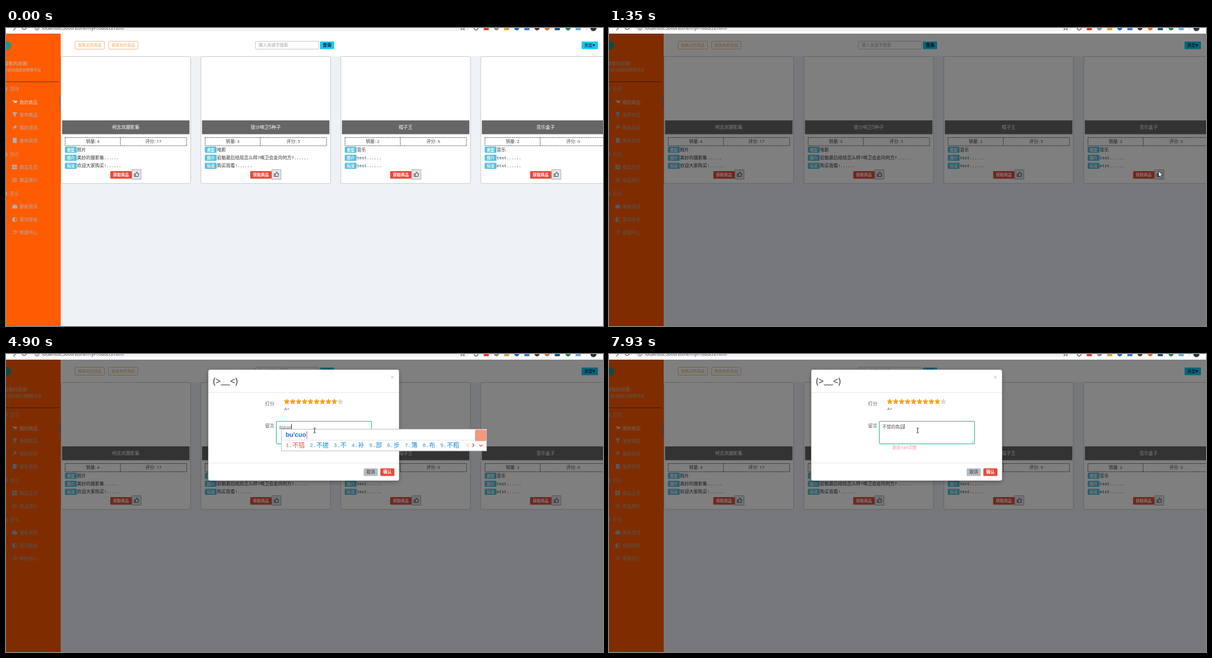
An HTML page that plays this animation: 1059x529 px, repeating every 8 s.

```html
<!DOCTYPE html>
<html lang="zh-CN">
<head>
<meta charset="utf-8">
<title>myProducts</title>
<style>
html, body { margin: 0; width: 100%; height: 100%; overflow: hidden; background: #eef2f7; }
svg { display: block; width: 1059px; height: 529px; font-family: "Open Sans", "Noto Sans CJK SC", "Noto Sans CJK", sans-serif; }
text { white-space: pre; }
.cjk { font-family: "Noto Sans CJK SC", "Noto Sans CJK", sans-serif; }
.mono { font-family: "Liberation Mono", monospace; }
.mid { text-anchor: middle; }
.b { font-weight: 700; }
.pinyin { font: bold 11.2px "Liberation Sans", sans-serif; }
.comp { text-decoration: underline; }
.line { fill: none; stroke: currentColor; }
</style>
</head>
<body>
<svg id="stage" viewBox="0 0 1059 529"></svg>
<script>
const LOOP = 8000;
const esc = s => s.replace(/&/g, '&amp;').replace(/</g, '&lt;').replace(/>/g, '&gt;');
const rect = (x, y, w, h, fill, more = '') =>
  `<rect x="${x}" y="${y}" width="${w}" height="${h}" fill="${fill}" ${more}/>`;
const circle = (x, y, r, fill, more = '') => `<circle cx="${x}" cy="${y}" r="${r}" fill="${fill}" ${more}/>`;
const path = (d, more) => `<path d="${d}" ${more}/>`;
const group = (x, y, body, more = '') => `<g transform="translate(${x} ${y})" ${more}>${body}</g>`;
// y is the vertical centre of the line
const text = (x, y, s, size, fill, cls = '', html) =>
  `<text x="${x}" y="${y}" dy=".37em" font-size="${size}" fill="${fill}" class="${cls}">${html || esc(s)}</text>`;
const mixed = (x, y, s, size, fill) => text(x, y, '', size, fill, '',
  s.replace(/[ -~]+/g, m => `<tspan class="mono" font-size="${size * 0.905}">${m}</tspan>`));

function toolbar() {
  const icons = [[852, '#e8402c', 1], [870, '#8d949b'], [888, '#e9a23b', 1], [906, '#2f6fb5'], [924, '#3f7fd8', 1],
    [942, '#5a3b2e'], [960, '#f0702a'], [978, '#23527c', 1], [997, '#1f8a55'], [1015, '#62b5e0', 1]];
  return rect(0, 0, 1059, 10, '#fff') +
    rect(45, -12, 778, 17.5, '#f1f3f4', 'rx="8"') +
    path('M13 4l4-4M28.500 0a4 4 0 0 0 7.500 0', 'class="line" color="#5f6368" stroke-width="1.300"') +
    circle(55, 0, 3.6, 'none', 'stroke="#5f6368"') + rect(54.5, -1, 1, 3, '#5f6368') +
    text(64, -0.4, 'localhost:3000/store/myProducts.html', 8.15, '#44484c') +
    path('M807 3.500l3-2 3 2-1-4h-4z', 'class="line" color="#5f6368"') +
    circle(834, 0, 3.5, 'none', 'stroke="#444" stroke-width="1.3"') +
    icons.map(([x, c, sq]) => sq ? rect(x - 4.5, -5, 9, 9, c) : circle(x, 0, 4.3, c)).join('') +
    rect(1029, 0, 1, 4, '#ccc') + circle(1042, 0, 5.5, '#2b3440');
}

const ICONS = {
  cart: 'M0 1h2l1 4h4l1-3h-6zM3 7.500h1M6 7.500h1',
  filter: 'M0 0h8l-3 3.500v4l-2-1v-3z',
  pin: 'M4.500 0l3 3-2 1-2 2-2-2 2-2zM2 5l-2 3',
  book: 'M1 0h6v8h-6zM2.500 0v8',
  grid: 'M0 0h3v3h-3zM4.500 0h3v3h-3zM0 4.500h3v3h-3zM4.500 4.500h3v3h-3z',
  list: 'M0 1h8M0 3h8M0 5h8M0 7h8',
  camera: 'M0 2h2l1-1.500h2l1 1.500h2v5h-8zM4 3.500v2',
  half: 'M4 0a4 4 0 0 0 0 8zM4 0a4 4 0 0 1 0 8',
  hand: 'M0 3h2l2-2.500 1 .5-1 1.500h4v1.200h-3M0 6.500h4l2-.8v-2'
};

function sidebar() {
  const ink = '#a7b1c2';
  const items = [[132, 'cart', '我的商品'], [154.5, 'filter', '发布商品'], [177, 'pin', '我的资讯'], [200, 'book', '发布资讯'],
    [247.5, 'grid', '商品主页'], [270, 'list', '商品排行'], [317.5, 'camera', '最新资讯'], [340.5, 'half', '资讯排名'],
    [363, 'hand', '帮助中心']];
  const open = ['half', 'hand'];
  return rect(0, 10, 97, 519, '#ff5b00') +
    circle(2, 31, 7.5, '#2a9182') +
    text(-4, 62.5, '尊敬的顾客:', 8.3, '#bfb8b4') +
    text(-4, 75, '欢迎光临原创购物平台', 6.65, '#bfb8b4') +
    rect(0, 95, 94, 1, '#7a2f05') +
    rect(95, 120, 2, 24, '#8b6a80') +
    [[108, '管理'], [224.5, '商店'], [294, '更多']].map(([y, s]) =>
      rect(0, y - 3, 2, 6, ink, 'opacity=".7"') + text(7, y, s, 8, ink, '', `<tspan opacity=".7">${s}</tspan>`)).join('') +
    items.map(([y, icon, s], i) => {
      const c = i ? ink : '#d2d3d6';
      return group(11.5, y - 4.5, path(ICONS[icon],
        `fill="${open.includes(icon) ? 'none' : c}" stroke="${c}" stroke-width=".8"`) +
        (icon === 'half' ? path('M4 0a4 4 0 0 0 0 8z', `fill="${c}"`) : '')) + text(24, y, s, 8, c);
    }).join('');
}

function header() {
  const outline = (x, s) => rect(x, 23.5, 52, 14, '#fff', 'stroke="#f0bd87" rx="1.5"') +
    text(x + 26, 30.5, s, 7, '#eda962', 'mid');
  return rect(97, 10, 962, 40, '#fff') +
    outline(122.5, '我购买的商品') + outline(182, '我发布的商品') +
    rect(442.5, 23.5, 112, 14, '#fff', 'stroke="#c8c8c8" rx="1.5"') +
    text(448, 30.5, '输入关键字搜索', 7.5, '#a5a5a5') +
    rect(557, 24, 25, 13.5, '#0fcaf8', 'rx="1"') + text(569.5, 30.5, '查询', 7.5, '#111', 'mid b') +
    rect(1021, 24, 29, 13.5, '#0fcaf8', 'rx="1"') + text(1026, 30.5, '类型', 7.2, '#111') +
    path('M1040.500 29h4.500l-2.250 4z', 'fill="#111"');
}

function card([title, sold, score, kind, intro, usage], i) {
  const row = (y, tag, s) => rect(7.5, y - 5.3, 21, 10.8, '#5bc0de', 'rx="1.5"') +
    text(18, y, tag, 6.8, '#fff', 'mid b') + mixed(29, y, s, 8, '#333');
  return group(97 + 248.2 * i, 0,
    rect(0.5, 50.5, 230, 225.5, '#fff', 'stroke="#c6c8cb" rx="2"') +
    rect(2.5, 164, 226, 24.5, '#666') + text(115.5, 176, title, 8.1, '#fff', 'mid') +
    path('M8 194.500h215.500v14.500h-215.500zM106 194.500v14.500', 'class="line" color="#444" stroke-dasharray="2 1.200"') +
    text(57, 201.5, '销量: ' + sold, 7.8, '#444', 'mid') + text(164.5, 201.5, '评分: ' + score, 7.8, '#444', 'mid') +
    row(216, '类型', kind) + row(230.3, '简介', intro) + row(244.5, '玩法', usage) +
    rect(88, 254, 38, 13.5, '#e74c3c', 'rx="1.5"') + text(107, 260.5, '获取商品', 7, '#fff', 'mid b') +
    rect(126.5, 251.5, 16, 17, '#e4e6ea', 'stroke="#a9abaf"') +
    path('M130.500 259h2v4.500h-2zM132.500 259.500l2.500-4.300q1.500.3.700 3.300h2.800l-.8 5h-5.200', 'class="line" color="#2c3e50" stroke-width=".9"'));
}

const CARDS = [
  ['柯念岚摄影集', 4, 17, '照片', '美妙的摄影集......', '欢迎大家购买!......'],
  ['银沙哨卫5种子', 3, 5, '电影', '岩魁最后结局怎么样?哨卫会走向何方?......', '购买观看!......'],
  ['帽子王', 2, 9, '音乐', 'test......', 'test......'],
  ['音乐盒子', 2, 0, '音乐', 'test......', 'etst......']
].map(c => c.map(v => String(v).replace('?', '?').replace('?', '?').replace('!', '!')));

const starPath = Array.from({ length: 10 }, (_, k) => {
  const r = k % 2 ? 2.3 : 4.9, a = Math.PI * (k / 5 - 0.5);
  return (r * Math.cos(a)).toFixed(2) + ' ' + (r * Math.sin(a)).toFixed(2);
}).join('L');

function modal() {
  const stars = Array.from({ length: 10 }, (_, i) =>
    group(498 + 10.57 * i, 84.7, path(`M${starPath}Z`, 'class="star" stroke-width=".6" stroke-linejoin="round"'))).join('');
  return rect(359, 30, 338, 197, '#000', 'rx="4" opacity=".3" filter="url(#soft)"') +
    rect(358.5, 27.5, 339, 197.5, '#fff', 'rx="3.5" stroke="#555" stroke-opacity=".5"') +
    text(367, 48, '(>﹏<)', 16, '#555', '', '<tspan font-weight="600">(&gt;﹏&lt;)</tspan>') +
    text(685.3, 41, '×', 11, '#b5b5b5', 'mid') +
    rect(359, 68, 338, 1, '#e5e5e5') + rect(359, 193, 338, 1, '#e5e5e5') +
    text(459.5, 88.3, '打分', 8.4, '#666') + text(459.5, 126.5, '留言', 8.4, '#666') +
    stars + `<text id="hint" x="493.500" y="100" font-size="7.500" fill="#666"></text>` +
    rect(479.5, 119.5, 169, 40, '#fff', 'stroke="#bcbcbc" rx="1"') +
    rect(479.5, 119.5, 169, 40, 'none', 'id="focus" stroke="#1ab394" rx="1"') +
    path('M643 158l4-4M645.500 158l1.500-1.500', 'class="line" color="#888" stroke-width=".7"') +
    '<text id="typed" x="485" y="131.500" font-size="7.600" fill="#555" class="cjk"><tspan id="done"></tspan><tspan id="comp" class="comp" font-size="7.200" font-family="Open Sans, sans-serif"></tspan></text>' +
    rect(0, 124, 1, 9, '#333', 'id="caret"') +
    '<text id="count" x="502.500" y="169" font-size="7.600" fill="#ffb6c1" class="b"></text>' +
    rect(634.5, 203, 25, 13.5, '#b4bac0', 'rx="1.5"') + text(647, 209.7, '取消', 7.5, '#333', 'mid') +
    rect(664, 203, 25, 13.5, '#e74c3c', 'rx="1.5"') + text(676.5, 209.7, '确认', 7.5, '#fff', 'mid b');
}

const CURSORS = {
  arrow: path('M0 0v10.500l2.400-2.200 1.700 3.900 1.600-.7-1.700-3.800h3.300z', 'fill="#fff" stroke="#111" stroke-width=".8"'),
  hand: path('M-.5 1q1-1.500 2 0v4.200l4.500 1q1 .4.800 1.800l-.8 4.500h-5l-3.500-5q.3-1.200 1.500-.4l.5.6z', 'fill="#fff" stroke="#111" stroke-width=".8"'),
  beam: path('M-1.800.5h1.300l.5.5.5-.5h1.300M0 1v7.500M-1.800 9h1.300l.5-.5.5.5h1.300', 'class="line" color="#111" stroke-width=".9"')
};

const $ = id => document.getElementById(id);
$('stage').innerHTML =
  '<defs><filter id="soft"><feGaussianBlur stdDeviation="4"/></filter></defs>' +
  rect(0, 0, 1059, 529, '#eef2f7') + header() + CARDS.map(card).join('') + sidebar() + toolbar() +
  rect(0, 10, 1059, 519, '#000', 'id="shade"') +
  `<g id="modal">${modal()}</g><g id="ime"></g>` +
  Object.keys(CURSORS).map(k => `<g id="${k}">${CURSORS[k]}</g>`).join('');
const stars = document.querySelectorAll('.star');

// [start, end, number of steps]
const BURSTS = [[260, 950, 10], [1110, 1870, 11], [1950, 2350, 6], [2580, 2640, 2], [2810, 3590, 11], [3670, 3740, 2]];
function snap(t) {
  const burst = BURSTS.filter(b => b[0] <= t).pop();
  if (!burst) return 0;
  const [a, b, n] = burst, step = (b - a) / (n - 1);
  return a + step * Math.min(n - 1, Math.floor((t - a) / step + 1e-6));
}
function lerp(keys, t, col = 1) {
  const i = keys.findIndex(k => k[0] > t);
  if (i < 0) return keys[keys.length - 1][col];
  if (!i) return keys[0][col];
  const a = keys[i - 1], b = keys[i];
  return a[col] + (b[col] - a[col]) * (t - a[0]) / (b[0] - a[0]);
}

const SHADE = [[1110, 0], [1186, 0.04], [1262, 0.28], [1338, 0.5]];
const FOCUS = [[3590, 0.3], [3670, 0.7], [3740, 1]];
const POINTER = [[260, 1027, 459], [720, 972, 300], [874, 965, 248], [950, 975, 254], [1490, 975, 254], [1870, 632, 118],
  [2030, 577, 79], [2190, 590, 81], [2350, 588, 81], [2580, 586, 81], [2640, 583, 80], [2810, 581, 78],
  [3200, 560, 106], [3590, 547.5, 131]];

// [time, committed text, pinyin, candidates or remaining count]
const TYPING = [
  [3590, '', ''],
  [4430, '', 'b', '吧 把 不 被 别 本 包 比 帮'],
  [4520, '', 'bu', '不 部 步 布 补 捕 簿 埠 卜'],
  [4670, '', "bu'c", '不错 不曾 不出 不存在 不成功 不彻底 不承认 不出来 不常见'],
  [4750, '', "bu'cu", '不错 不出 不粗 不 部 步 布 补 捕'],
  [4900, '', "bu'cuo", '不错 不搓 不 补 部 步 簿 布 不粗'],
  [5060, '不错', '', 195],
  [5120, '不错', '', 198],
  [5830, '不错', 'd', '的 到 都 大 多 得 对 但 等'],
  [6040, '不错', 'de', '的 得 的话 德 得到 的确 得了 地 得以'],
  [6130, '不错的', '', 196],
  [6220, '不错的', '', 197],
  [6770, '不错的', 's', '是 时 上 三 所 说 四 岁 诉'],
  [6850, '不错的', 'sh', '是 上 时候 说 生活 什么 事 上海 使'],
  [6920, '不错的', 'sha', '啥 杀 沙 傻 纱 厦 刹 砂 莎'],
  [7000, '不错的', 'shan', '山 善 闪 删 扇 衫 杉 珊 山上'],
  [7230, '不错的', 'shang', '上 商 伤 尚 赏 裳 晌 上岗 熵'],
  [7460, '不错的', "shang'p", '商品 上面 上铺 商铺 上坡 赏评 上盘 上品 上票'],
  [7550, '不错的', "shang'pi", '商品 上皮 上篇 上批 上 商 伤 尚 赏'],
  [7700, '不错的', "shang'pin", '商品 上品 上 商 伤 尚 赏品 裳 晌'],
  [7930, '不错的商品', '', 189]
];
const CARET_OFF = [[4050, 4430], [5600, 5830], [6620, 6770]];

function imeWindow(done, pinyin, words) {
  const x = 488 + done.length * 7.6, y = done ? 136.5 : 133.5;
  let cx = 8, list = '';
  words.split(' ').forEach((w, i) => {
    const fill = i ? '#1a8ae0' : '#ff4b3e';
    list += text(cx, 28.5, i + 1 + '.', 9.2, fill, 'mono') + text(cx + 11.5, 28.5, w, 11, fill, 'cjk');
    cx += 20.5 + 11 * w.length;
  });
  const w = cx + 39.5;
  const arrow = (ax, d, c) => path(`M${ax} ${d}`, `class="line" color="${c}" stroke-width="1.500"`);
  return group(x + 0.5, y,
    rect(0, 0, w, 38.5, '#fff', 'stroke="#b9bcc0"') + rect(1, 19, w - 22, 1, '#e3e3e3') +
    `<text id="pinyin" x="7.500" y="13.700" class="pinyin" fill="#0b6fd4">${pinyin}</text>` +
    rect(0, 3.5, 1, 13, '#ff4b3e', 'id="bar"') + list +
    arrow(w - 32, '25.500l-2.500 3 2.500 3', '#d5d5d5') + arrow(w - 25, '25.500l2.500 3-2.500 3', '#ff4b3e') +
    arrow(w - 13, '27.500l3 2.700 3-2.700', '#ff4b3e') +
    rect(w - 20.5, 1, 20, 20, '#f4977c', 'rx="2"'));
}

let lastRow;
function type(t) {
  const row = TYPING.filter(r => r[0] <= t).pop();
  if (row === lastRow) return;
  lastRow = row;
  const [, done, pinyin, info] = row || [0, '', ''];
  const letters = pinyin.replace("'", '');
  const left = pinyin ? 200 - done.length - letters.length : info;
  $('done').textContent = done;
  $('comp').textContent = letters;
  $('count').textContent = left ? `剩余${left}字数` : '';
  $('caret').setAttribute('x', 485 + (done || letters ? $('typed').getComputedTextLength() : 0));
  $('ime').innerHTML = pinyin ? imeWindow(done, pinyin, info) : '';
  if (pinyin) $('bar').setAttribute('x', 8.5 + $('pinyin').getComputedTextLength());
}

function draw(t) {
  const s = snap(t);
  $('shade').setAttribute('opacity', lerp(SHADE, s));

  const p = Math.min(1, Math.max(0, (s - 1338) / 300));
  $('modal').setAttribute('opacity', Math.min(1, p * 2));
  $('modal').setAttribute('transform', `translate(0 ${-49 * (1 - p) ** 2})`);

  const score = s < 2025 ? 0 : s >= 2180 && s < 2580 ? 10 : 9;
  stars.forEach((el, i) => {
    el.setAttribute('fill', i < score ? '#f9a80c' : '#dcdcdc');
    el.setAttribute('stroke', i < score ? '#e08e0b' : '#c8c8c8');
  });
  $('hint').textContent = score ? (score > 9 ? 'A++' : 'A+') : '';

  $('focus').setAttribute('opacity', s < 3589 ? 0 : lerp(FOCUS, s));
  type(t);
  $('caret').setAttribute('opacity', t >= 3590 && !CARET_OFF.some(([a, b]) => t >= a && t < b) ? 1 : 0);

  const x = lerp(POINTER, s, 1), y = lerp(POINTER, s, 2);
  const kind = s < 260 ? '' : s >= 2025 && y < 92 ? 'hand' : s > 2810 && y > 116 ? 'beam' : 'arrow';
  for (const k in CURSORS) {
    $(k).setAttribute('transform', `translate(${x} ${y})`);
    $(k).setAttribute('visibility', k === kind ? 'visible' : 'hidden');
  }
}

const start = performance.now();
function frame() {
  draw((performance.now() - start) % LOOP);
  requestAnimationFrame(frame);
}
draw(0);
requestAnimationFrame(frame);
</script>
</body>
</html>
```
